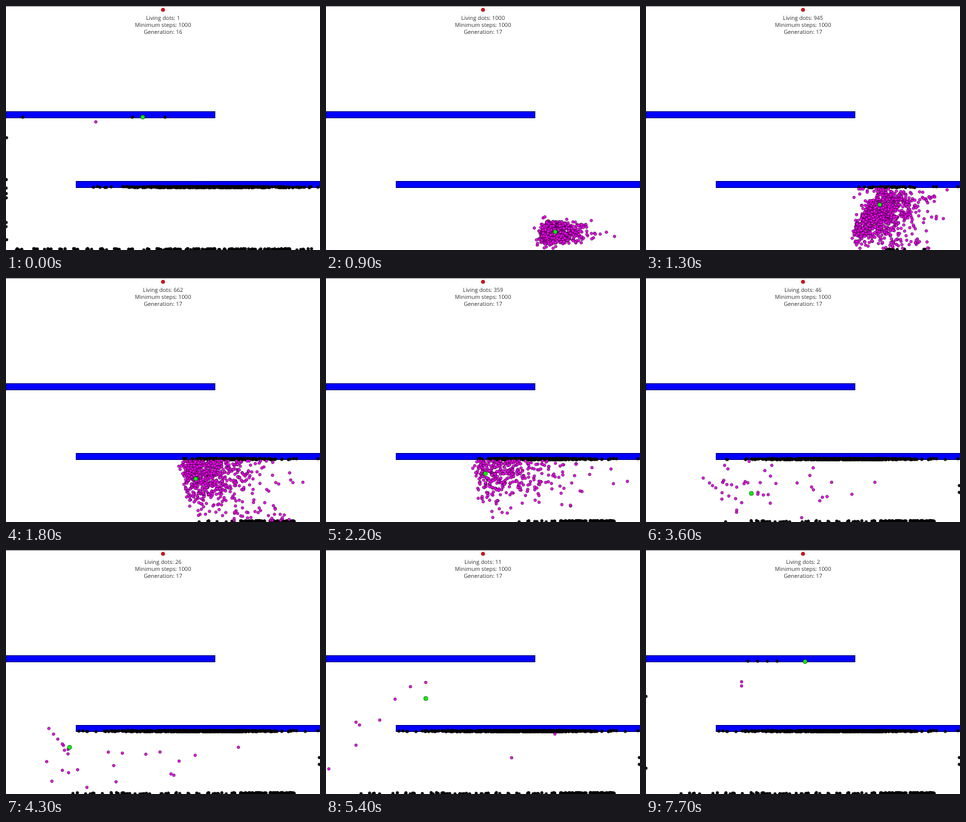
Recreate the animation shown at these times as an HTML page with a canvas. Size 450 by 350 pixels, loop 8000 ms.

```html
<!DOCTYPE html>
<html lang="en">
<head>
<meta charset="utf-8">
<title>Evolving dots</title>
<style>
  html, body { margin: 0; width: 100%; height: 100%; overflow: hidden; background: #fff; }
  canvas { display: block; }
  #stats {
    position: absolute; left: 0; top: 13px; width: 450px;
    font: 8px/10px "Open Sans", "Noto Sans", sans-serif;
    text-rendering: geometricPrecision;
    color: #333; text-align: center; white-space: pre;
  }
</style>
</head>
<body>
<canvas id="stage" width="450" height="350"></canvas>
<div id="stats"></div>
<script>
const LOOP = 8000, BIRTH = 500, COUNT = 1000;
const ctx = document.getElementById('stage').getContext('2d');
const stats = document.getElementById('stats');

let seed = 17;
function rand() {
  seed = (seed + 0x6D2B79F5) | 0;
  let z = Math.imul(seed ^ (seed >>> 15), 1 | seed);
  z = (z + Math.imul(z ^ (z >>> 7), 61 | z)) ^ z;
  return ((z ^ (z >>> 14)) >>> 0) / 4294967296;
}
const between = (lo, hi) => lo + (hi - lo) * rand();
const clamp = (v, lo, hi) => Math.max(lo, Math.min(hi, v));
const repeat = (n, make) => Array.from({ length: n }, (_, i) => make(i));
const onWall = x => [clamp(x, 102, 447), between(259, 260.6)];
const onFloor = x => [clamp(x, 2, 447), between(348, 350)];

// Moments at which the picture is refreshed; the pace slows down
const ticks = [];
function addTicks(from, to, step) {
  for (let t = from; t <= to; t += step) ticks.push(t);
}
addTicks(0, 200, 100);
addTicks(500, 2400, 100);
addTicks(2800, 3200, 100);
addTicks(3400, 3600, 200);
addTicks(3700, 4700, 200);
addTicks(5000, 5800, 400);
addTicks(6100, 7000, 300);
addTicks(7200, 7500, 300);
ticks.push(7700);

// Survivors over time: [ms, living]
const SURVIVAL = [[1100, 1000], [1300, 945], [1800, 662], [2800, 143], [3600, 46], [5400, 11]];
function deathTime(i) {
  const k = SURVIVAL.findIndex(s => s[1] <= i);
  const [t0, n0] = SURVIVAL[k - 1], [t1, n1] = SURVIVAL[k];
  return t0 + (t1 - t0) * Math.log(n0 / (i + 0.5)) / Math.log(n0 / n1);
}

// Shape of the swarm: [ms, left, slant, spread, top, height, power]
const SWARM = [
  [500, 225, 0, 0, 340, 0, 1],
  [1000, 318, 10, 13, 298, 46, 1],
  [1300, 290, 44, 15.5, 263, 84, 1.15],
  [1800, 260, -18, 22, 263, 84, 1.7],
  [2800, 152, 0, 38, 263, 76, 1.5],
  [3600, 80, 0, 62, 266, 80, 1],
  [5400, 10, 0, 75, 268, 80, 1]
];
function swarmPath() {
  const depth = (rand() + rand()) / 2;
  const lag = -Math.log((1 - rand()) * (1 - rand()));
  return SWARM.map(([t, left, slant, spread, top, height, power]) => {
    const q = depth ** power;
    return [t, left + slant * (1 - q) ** 1.7 + spread * lag, top + height * q];
  });
}

// Smooth curve through [ms, x, y] points
function at(path, t) {
  const last = path.length - 1;
  if (t >= path[last][0]) return path[last].slice(1);
  let k = 0;
  while (k < last - 1 && t >= path[k + 1][0]) k++;
  const slope = (i, c) => {
    const a = path[Math.max(0, i - 1)], b = path[Math.min(last, i + 1)];
    return (b[c] - a[c]) / (b[0] - a[0]);
  };
  const p = path[k], q = path[k + 1], d = q[0] - p[0], u = (t - p[0]) / d;
  return [1, 2].map(c =>
    p[c] * (1 + 2 * u) * (1 - u) ** 2 + slope(k, c) * d * u * (1 - u) ** 2 +
    q[c] * u * u * (3 - 2 * u) + slope(k + 1, c) * d * u * u * (u - 1));
}

function exitOf(end, [x, y]) {
  if (end > 2800) {
    if (x < 40) return [0, y];
    if (x > 430) return [449, y];
    return x < 100 || rand() < 0.4 ? onFloor(x) : onWall(x);
  }
  if (end < 1900 && rand() < 0.25)
    return onFloor(rand() < 0.85 || end < 1300 ? between(337, 414) : between(275, 337));
  return onWall(x);
}

function swarmDot(i) {
  const route = swarmPath(), end = deathTime(i), turn = end - 300;
  const path = route.filter(p => p[0] < turn - 100);
  path.push([turn, ...at(route, turn)], [end, ...exitOf(end, at(route, end))]);
  return { path, end, caged: true };
}

// The green dot rounds the lower wall and hits the upper one
const leader = [[500, 225, 340], [1000, 346, 318], [1300, 335, 285], [1800, 272, 288],
  [2800, 174, 273], [3600, 151, 309], [4500, 84, 272], [5400, 143, 213], [6700, 228, 160]];

const fromSwarm = (...tail) => swarmPath().slice(0, 5).concat(tail);

// Dots that follow the leader up to the wall
const climber = k => fromSwarm([3600, 82 + 9 * k, 287 + 7 * k], [4500, 66 + 4 * k, 245 + 8 * k],
  [5400, 143 - 22 * k, 190 + 6 * k * k], [6300 + 200 * k, 188 - 14 * k, 159.5]);

// Two dots that stay alive, the second one below the first
const survivor = k => fromSwarm(...[[3600, 130, 300], [4500, 80, 280], [5400, 43, 247],
  [6100, 5, 240], [6400, 35, 238], [7000, 83, 229], [7200, 113, 221], [7500, 127, 221],
  [7700, 137, 189]].map(([t, x, y]) => [t, x, y + k * (6 + 27 * clamp((6000 - t) / 600, 0, 1))]));

const stray = (x, y, ...exit) => fromSwarm([3600, Math.max(x, 110), 293], [5400, x, y], exit);

const mortal = path => ({ path, end: path[path.length - 1][0] });
const lastOnes = [
  mortal(leader),
  ...repeat(4, k => mortal(climber(k))),
  ...repeat(2, k => ({ path: survivor(k), end: Infinity })),
  mortal(stray(4, 314, 5800, 0, 313)),
  mortal(stray(48, 251, 6100, 0, 210)),
  mortal(stray(328, 264, 5800, 330, 260)),
  mortal(stray(266, 298, 6700, 278, 349))
];
const dots = repeat(COUNT, i => lastOnes[i] || swarmDot(i));

// Remains of the previous generation
const remains = [
  ...[24, 181, 228].map(x => [x, 159.5]),
  ...repeat(8, () => [between(0, 1), between(165, 345)]),
  ...repeat(450, () => onWall(300 + (rand() + rand() + rand() - 1.5) * 110)),
  ...repeat(34, () => onWall(between(115, 448))),
  ...repeat(120, () => onFloor(between(213, 407))),
  ...repeat(10, i => 15 + 20 * i).flatMap(x => repeat(5, () => onFloor(x + between(0, 10)))),
  ...repeat(6, () => onFloor(between(415, 438)))
];

function disc(x, y, r, fill) {
  ctx.beginPath();
  ctx.arc(x, y, r, 0, 2 * Math.PI);
  ctx.fillStyle = fill;
  ctx.fill();
  ctx.strokeStyle = '#000';
  ctx.lineWidth = 0.5;
  ctx.stroke();
}
const deadDot = (x, y) => disc(x, y, 2, '#000');
const liveDot = (x, y) => disc(x, y, 2, '#f0f');
const bestDot = (x, y) => disc(x, y, 3, '#0f0');

function wall(x, y, w) {
  ctx.fillStyle = '#00f';
  ctx.fillRect(x, y, w, 10);
  ctx.strokeStyle = '#000';
  ctx.lineWidth = 0.5;
  ctx.strokeRect(x + 0.25, y + 0.25, w - 0.5, 9.5);
}

function drawPrevious(t) {
  remains.forEach(p => deadDot(...p));
  if (t < 200) liveDot(128.7 + t * 0.025, 166.3 - t * 0.033);
  else deadDot(133, 160);
  bestDot(196, 159.3);
  return 1;
}

function drawSwarm(t) {
  let living = 0;
  for (let i = COUNT - 1; i >= 0; i--) {
    const { path, end, caged } = dots[i];
    const alive = t < end;
    let [x, y] = at(path, t);
    if (alive) {
      living++;
      x = clamp(x, 2, 448);
      if (caged) y = clamp(y, 262.5, 347.5);
    }
    (i === 0 ? bestDot : alive ? liveDot : deadDot)(x, y);
  }
  return living;
}

function draw(t) {
  ctx.fillStyle = '#fff';
  ctx.fillRect(0, 0, 450, 350);
  ctx.fillStyle = '#999';
  ctx.fillRect(0, 0, 450, 1);
  disc(225, 5.5, 2.5, '#f00');
  wall(0, 151, 300);
  wall(100, 251, 351);
  const reborn = t >= BIRTH;
  const living = reborn ? drawSwarm(t) : drawPrevious(t);
  stats.textContent =
    `Living dots: ${living}\nMinimum steps: 1000\nGeneration: ${reborn ? 17 : 16}`;
}

const start = performance.now();
let shown = -1;
function frame() {
  const now = (performance.now() - start) % LOOP;
  const tick = ticks.filter(t => t <= now).pop();
  if (tick !== shown) draw(shown = tick);
  requestAnimationFrame(frame);
}
frame();
</script>
</body>
</html>
```
